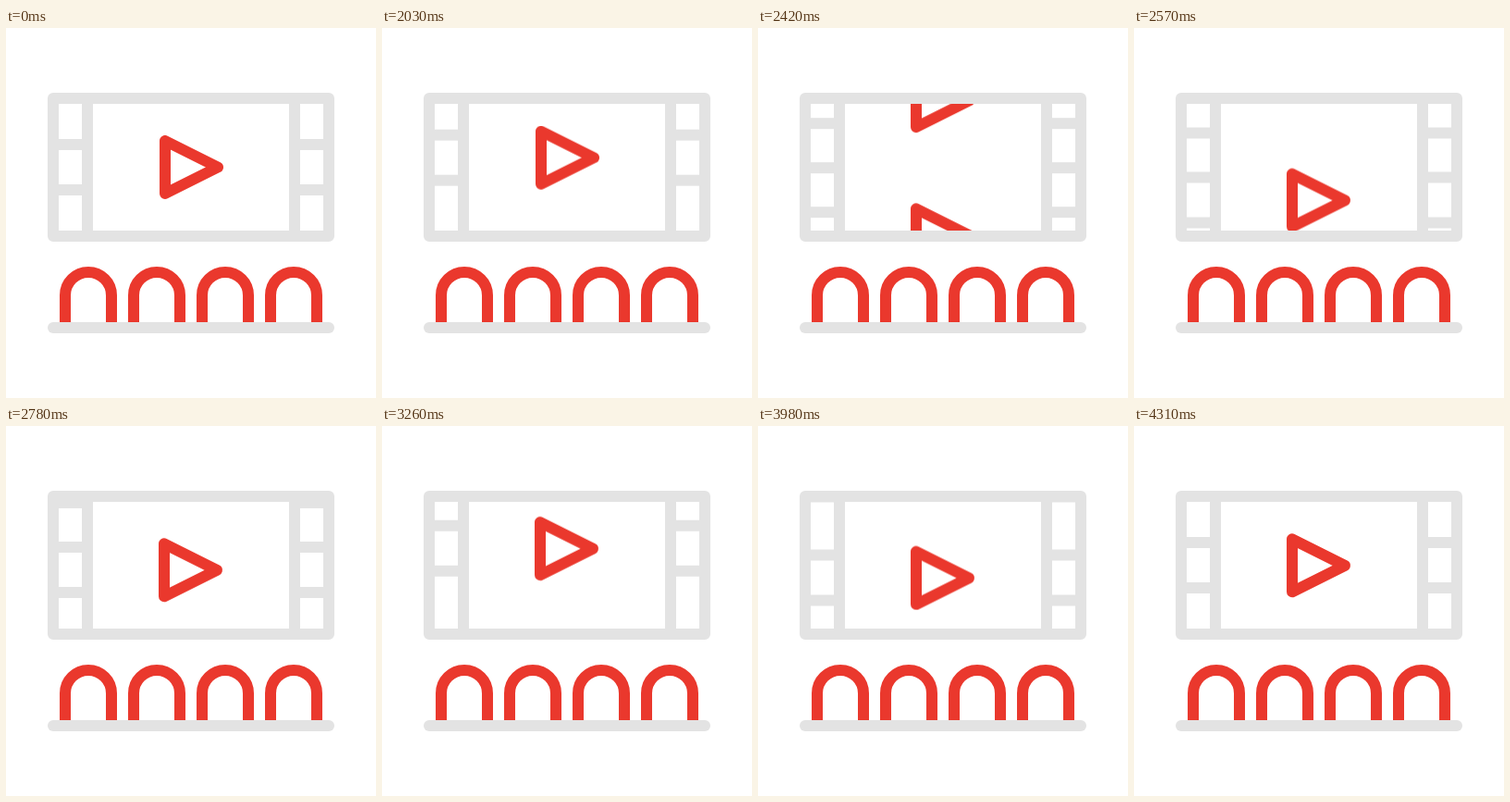
An HTML page that plays this animation: 400x400 px, repeating every 4340 ms.

```html
<!DOCTYPE html>
<html lang="en">
<head>
<meta charset="utf-8">
<title>Cinema</title>
<style>
  html, body { margin: 0; width: 100%; height: 100%; overflow: hidden; background: #fff; }
  svg { display: block; width: 100vw; height: 100vh; fill: none; stroke-width: 12; }
  .grey { stroke: #e3e3e3; }
  .red { stroke: #ea382d; stroke-linejoin: round; }
  .reel { animation: reel 4340ms linear infinite; }
  .late { animation: late 4340ms step-end infinite; }

  /* fast spin, overshoot, swing back, settle */
  @keyframes reel {
    0%, 46.773% { transform: translateY(0); }
    46.774% { transform: translateY(-10px); animation-timing-function: cubic-bezier(.18, .27, .14, 1); }
    76.498% { transform: translateY(-308.5px); animation-timing-function: cubic-bezier(.7, 0, .3, 1); }
    87.558% { transform: translateY(-274px); animation-timing-function: cubic-bezier(.7, 0, .3, 1); }
    99.309%, 100% { transform: translateY(-290px); }
  }
  @keyframes late {
    0% { transform: translateY(0); }
    73.7%, 100% { transform: translateY(-15px); }
  }
</style>
</head>
<body>
<svg viewBox="0 0 400 400">
  <defs>
    <clipPath id="screen"><rect x="51" y="82" width="298" height="137"/></clipPath>
    <path id="play" class="red" d="M172 122V179L229 150.5Z"/>
    <path id="bar" class="grey" d="M51 0H88M312 0H349"/>
    <path id="seat" class="red" d="M64 320V289a25 25 0 0 1 50 0V320"/>
  </defs>

  <g clip-path="url(#screen)">
    <g class="reel">
      <use href="#bar" y="126"/>
      <use href="#bar" y="175"/>
      <use href="#bar" y="236"/>
      <use href="#bar" y="271"/>
      <use href="#bar" y="320"/>
      <g class="late"><use href="#bar" y="368"/></g>
      <use href="#bar" y="416"/>
      <use href="#bar" y="465"/>
      <use href="#play"/>
      <use href="#play" x="-1" y="145"/>
      <use href="#play" x="-1" y="290.3"/>
    </g>
  </g>

  <path class="grey" d="M88 76V225M312 76V225"/>
  <rect class="grey" x="51" y="76" width="298" height="149" stroke-linejoin="round"/>

  <use href="#seat"/>
  <use href="#seat" x="74"/>
  <use href="#seat" x="148"/>
  <use href="#seat" x="222"/>
  <path class="grey" d="M51 324H349" stroke-linecap="round"/>
</svg>
</body>
</html>
```
